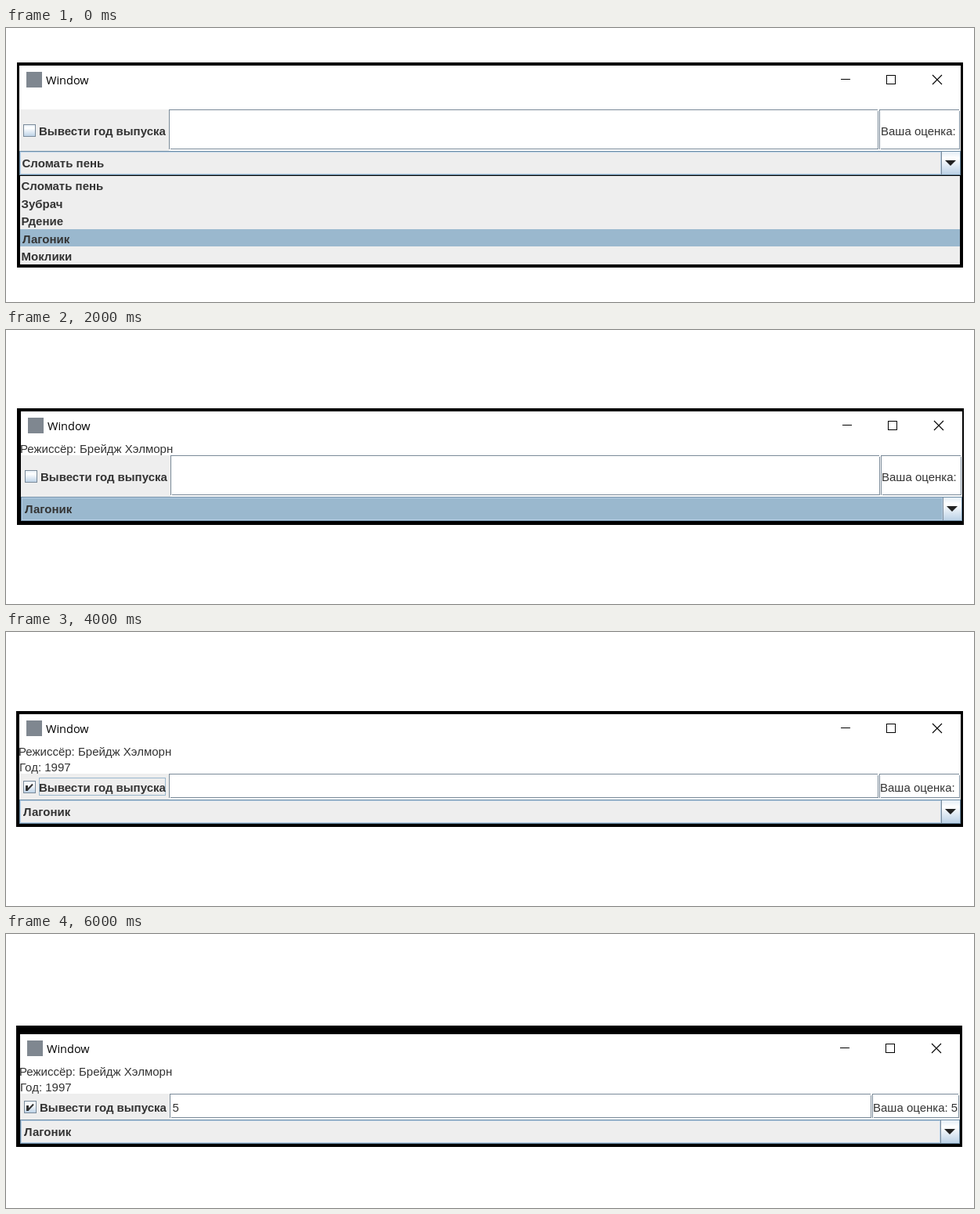
An HTML page with a canvas that plays this animation: 1236x350 px, repeating every 8 s.

```html
<!DOCTYPE html>
<html lang="ru">
<head>
<meta charset="utf-8">
<style>
  html, body { margin: 0; width: 100%; height: 100%; overflow: hidden; background: #fff; }
  canvas { display: block; width: 1236px; height: 350px; }
</style>
</head>
<body>
<canvas id="stage" width="1236" height="350"></canvas>
<script>
const ctx = document.getElementById('stage').getContext('2d');
const LINE = '#7a8a99', PANEL = '#eeeeee', SELECT = '#9ab8ce', INK = '#333333';
const PLAIN = '15px "Liberation Sans", Arial, sans-serif';
const BOLD = 'bold ' + PLAIN;
const TITLE = '14.5px "Open Sans", "Noto Sans", sans-serif';
const FILMS = ['Сломать пень', 'Зубрач', 'Рдение', 'Лагоник', 'Моклики'];
const PICK = 3;
const STEP = 2000;

// frame: outer black box, inner: window area, row: top and height of the field row
const states = [
  { frame: [14, 44, 1222, 306], inner: [17, 48, 1219, 302], dx: 0, rx: 0, dy: 0,
    row: [104, 53], rate: 1115, rateText: 1117, film: 0, open: true, labels: [] },
  { frame: [14, 100, 1223, 249], inner: [19, 104, 1221, 244], dx: 2, rx: 2, dy: 56,
    row: [160, 53], rate: 1117, rateText: 1118, film: PICK, lit: true, labels: [157] },
  { frame: [13, 101, 1222, 249], inner: [17, 105, 1219, 245], dx: 0, rx: 0, dy: 57,
    row: [181, 33], rate: 1115, rateText: 1116, film: PICK, checked: true, focus: true, labels: [158, 178] },
  { frame: [13, 117, 1221, 272], inner: [18, 128, 1218, 268], dx: 1, rx: -1, dy: 80,
    row: [204, 33], rate: 1106, rateText: 1107, film: PICK, checked: true, score: '5', labels: [181, 201] }
];
const INFO = ['Режиссёр: Брейдж Хэлморн', 'Год: 1997'];

function box(x0, y0, x1, y1, color) {
  ctx.fillStyle = color;
  ctx.fillRect(x0, y0, x1 - x0, y1 - y0);
}

function outline(x0, y0, x1, y1, color) {
  ctx.strokeStyle = color;
  ctx.lineWidth = 1;
  ctx.strokeRect(x0 + 0.5, y0 + 0.5, x1 - x0 - 1, y1 - y0 - 1);
}

function text(str, x, y, font, color = INK) {
  ctx.font = font;
  ctx.fillStyle = color;
  ctx.fillText(str, x, y);
}

function path(points) {
  ctx.beginPath();
  points.forEach(([x, y]) => ctx.lineTo(x, y));
}

function gloss(x0, y0, x1, y1) {
  const g = ctx.createLinearGradient(0, y0, 0, y1);
  g.addColorStop(0, '#e2ecf5');
  g.addColorStop(0.3, '#ffffff');
  g.addColorStop(1, '#b8cfe5');
  box(x0, y0, x1, y1, g);
}

function field(x0, y0, x1, y1) {
  box(x0, y0, x1, y1, '#fff');
  box(x0, y0, x1 - 1, y0 + 1, LINE);
  box(x0, y0, x0 + 1, y1, LINE);
  box(x0 + 2, y1 - 1, x1, y1, LINE);
  box(x1 - 1, y0 + 2, x1, y1, LINE);
}

function titleBar({ dx, rx, dy }) {
  box(26 + dx, 56 + dy, 46 + dx, 76 + dy, '#7f8790');
  text('Window', 51 + dx, 72 + dy, TITLE, '#000');
  box(1066 + rx, 65 + dy, 1078 + rx, 66 + dy, '#000');
  outline(1124 + rx, 60 + dy, 1136 + rx, 72 + dy, '#000');
  const x = 1183 + rx, y = 60 + dy;
  ctx.strokeStyle = '#000';
  ctx.lineWidth = 1.1;
  path([[x, y], [x + 12, y + 12]]);
  ctx.stroke();
  path([[x + 12, y], [x, y + 12]]);
  ctx.stroke();
}

function checkBox(s, x, y) {
  gloss(x, y, x + 16, y + 16);
  outline(x, y, x + 16, y + 16, LINE);
  if (s.checked) {
    box(x + 3, y + 6, x + 6, y + 13, INK);
    ctx.strokeStyle = INK;
    ctx.lineWidth = 2;
    path([[x + 5, y + 12], [x + 12, y + 4.5]]);
    ctx.stroke();
  }
  if (s.focus) outline(x + 20, y - 4, x + 182, y + 19, SELECT);
  text('Вывести год выпуска', x + 20, y + 14, BOLD);
}

function fieldRow(s) {
  const [top, h] = s.row, left = s.inner[0], end = top + h - 2;
  const boxY = top + Math.floor(h / 2) - 7;
  box(left, top, 208 + s.dx, top + h, PANEL);
  checkBox(s, 22 + s.dx, boxY);
  field(208 + s.dx, top, s.rate - 1, end);
  field(s.rate, top, s.inner[2] - 1, end);
  const score = s.score || '';
  text(score, 211.5 + s.dx, boxY + 14, PLAIN);
  text(('Ваша оценка: ' + score).trim(), s.rateText, boxY + 14, PLAIN);
}

function combo(s) {
  const x0 = s.inner[0], x1 = s.inner[2], y = 157 + s.dy;
  const bx = 1194 + s.rx;
  box(x0, y, x1, y + 31, s.lit ? SELECT : PANEL);
  outline(x0 + 1, y + 1, bx, y + 30, '#b8cfe5');
  gloss(bx, y, x1, y + 31);
  outline(bx, y, x1, y + 31, LINE);
  outline(x0, y, x1, y + 31, '#6f8ea6');
  text(FILMS[s.film], (s.film ? 22 : 20.5) + s.dx, y + 21, BOLD);
  path([[bx + 5, y + 12], [bx + 19, y + 12], [bx + 12, y + 19]]);
  ctx.fillStyle = '#222';
  ctx.fill();
}

function dropList(s) {
  const [x0, , x1, y1] = s.inner;
  box(x0, 188, x1, y1, '#000');
  box(x0 + 1, 189, x1 - 1, y1, PANEL);
  box(x0 + 1, 257, x1 - 1, 279, SELECT);
  FILMS.forEach((name, i) => text(name, i === PICK ? 21 : 19.5, Math.round(207 + i * 22.5), BOLD));
}

function draw(s) {
  box(0, 0, 1236, 350, '#fff');
  box(...s.frame, '#000');
  box(...s.inner, '#fff');
  titleBar(s);
  s.labels.forEach((y, i) => text(INFO[i], s.inner[0] - (i ? 0 : 1), y, PLAIN));
  fieldRow(s);
  combo(s);
  if (s.open) dropList(s);
}

const start = performance.now();
function tick() {
  const t = Math.max(0, performance.now() - start);
  draw(states[Math.floor(t / STEP) % states.length]);
  requestAnimationFrame(tick);
}
tick();
</script>
</body>
</html>
```
